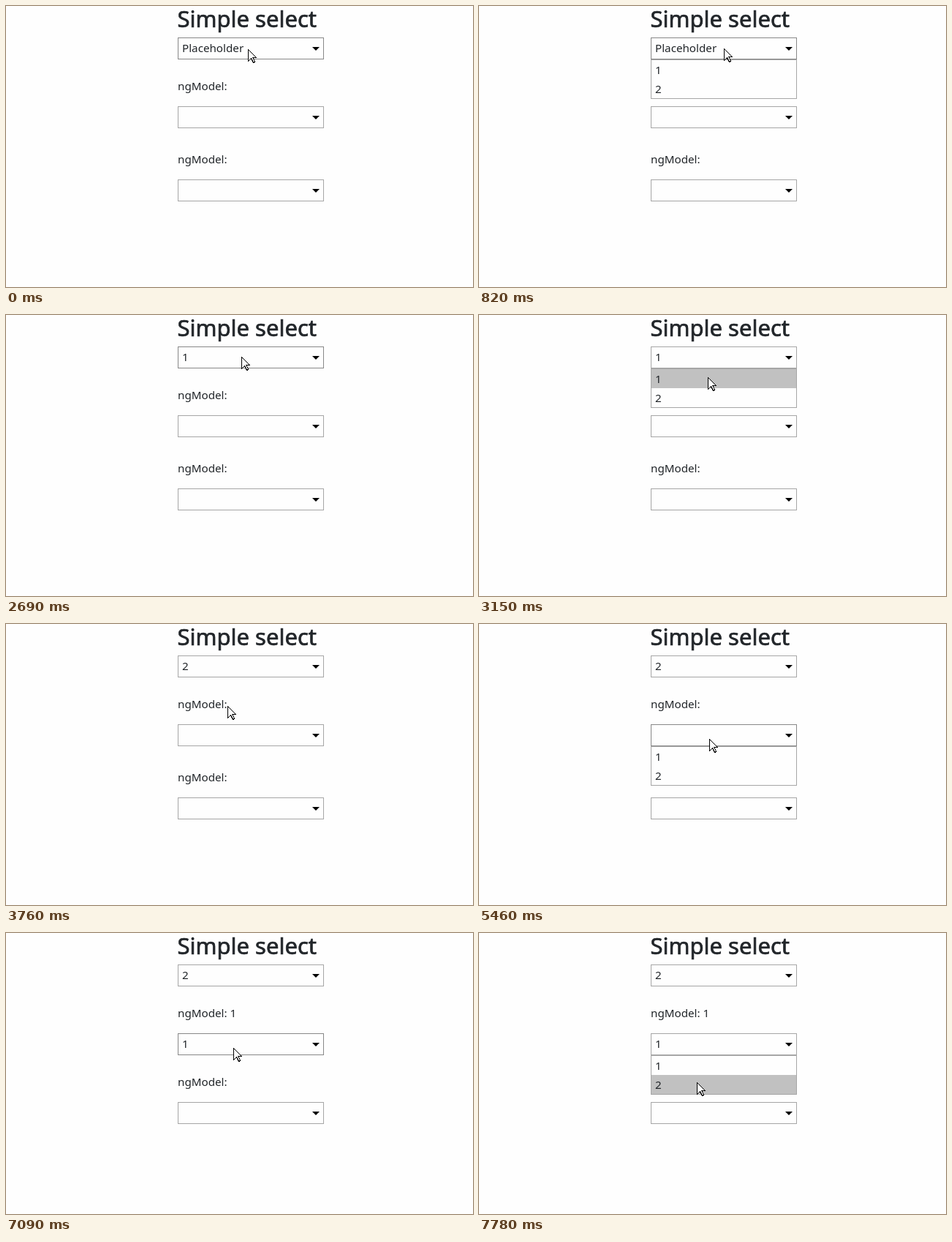
Animation, 639 px wide and 384 px high, one loop 8000 ms. Source, as an HTML page:

```html
<!DOCTYPE html>
<html lang="en">
<head>
<meta charset="utf-8">
<title>Simple select</title>
<style>
  html, body { margin: 0; width: 100%; height: 100%; overflow: hidden; background: #fefefe; }
  svg { display: block; width: 100%; height: 100%; }
  text { font: 15.2px "Noto Sans", "Open Sans", sans-serif; fill: #212529; white-space: pre; }
  .title { font-size: 31px; stroke: #212529; stroke-width: .7px; }
  .box { fill: #fefefe; stroke: #a6a6a6; }
  .box.hover { stroke: #888; }
  .row { fill: none; }
  .row.hover { fill: #c1c1c1; }
  .cursor { fill: #fff; stroke: #000; shape-rendering: crispEdges; }
</style>
</head>
<body>
<svg viewBox="0 0 639 384">
  <defs>
    <g id="field">
      <rect class="box" x="235.5" y=".5" width="199" height="29"/>
      <path d="M419 13h10l-5 5z"/>
    </g>
  </defs>
  <text class="title" x="234.5" y="29">Simple select</text>
  <g id="fields"></g>
  <g id="list">
    <rect class="box" x="235.5" y=".5" width="199" height="53"/>
    <rect class="row" x="236" y="1" width="198" height="26"/>
    <rect class="row" x="236" y="27" width="198" height="26"/>
    <text x="241" y="20">1</text>
    <text x="241" y="46">2</text>
  </g>
  <path class="cursor" id="cursor" d="M.5 .5V16.5L4.5 12.5 7.5 18.5 9.5 17.5 7 11.5H11.5Z"/>
</svg>
<script>
const LOOP = 8000;
const START = [331, 59];
// first step, last step, step count, resting point
const MOVES = [
  [270, 350, 2, 335, 58],
  [1370, 1600, 4, 318, 89],
  [2450, 2690, 4, 322, 57],
  [2996, 3380, 6, 303, 112],
  [4160, 4620, 7, 315, 154],
  [5460, 5770, 5, 312, 186],
  [6780, 7090, 5, 311, 157],
  [7470, 7780, 5, 298, 204]
];
// open time, close time, field index
const OPENINGS = [[820, 2150, 0], [2920, 3760, 0], [5000, 6230, 1], [7320, LOOP, 1]];

const NS = "http://www.w3.org/2000/svg";
const $ = id => document.getElementById(id);

function add(parent, tag, attrs) {
  const el = document.createElementNS(NS, tag);
  for (const key in attrs) el.setAttribute(key, attrs[key]);
  return parent.appendChild(el);
}

const fields = [0, 1, 2].map(i => {
  const g = add($("fields"), "g", {});
  const label = i ? add(g, "text", { x: 235, y: -22 }) : null;
  for (const part of $("field").children) g.appendChild(part.cloneNode(true));
  return { g, label, box: g.querySelector("rect"), value: add(g, "text", { x: 241, y: 20 }) };
});
const rows = [...document.querySelectorAll(".row")];

function pointer(t) {
  let [x, y] = START;
  for (const [from, to, steps, endX, endY] of MOVES) {
    if (t < from) break;
    const gap = (to - from) / (steps - 1);
    const u = Math.min(steps, Math.floor((t - from) / gap + 1.05)) / steps;
    const ease = u * u * (3 - 2 * u);
    x += (endX - x) * ease;
    y += (endY - y) * ease;
  }
  return [Math.round(x), Math.round(y)];
}

function place(el, x, y) {
  el.setAttribute("transform", `translate(${x} ${y})`);
}

function draw(t) {
  const [x, y] = pointer(t);
  const picked = t >= 6230;
  const tops = [43, 137, picked ? 231 : 237];
  const values = [t < 2150 ? "Placeholder" : t < 3760 ? "1" : "2", picked ? "1" : "", ""];

  fields.forEach((f, i) => {
    place(f.g, 0, tops[i]);
    f.box.classList.toggle("hover", y >= tops[i] && y < tops[i] + 30);
    f.value.textContent = values[i];
    if (f.label) f.label.textContent = "ngModel: " + values[i];
  });

  const open = OPENINGS.find(([from, to]) => t >= from && t < to);
  $("list").style.display = open ? "" : "none";
  if (open) {
    const top = tops[open[2]] + 30;
    place($("list"), 0, top);
    rows.forEach((row, i) => {
      const rowTop = top + 1 + i * 26;
      row.classList.toggle("hover", y >= rowTop && y < rowTop + 26);
    });
  }
  place($("cursor"), x, y);
}

const begin = performance.now();
function tick() {
  draw((performance.now() - begin) % LOOP);
  requestAnimationFrame(tick);
}
draw(0);
requestAnimationFrame(tick);
</script>
</body>
</html>
```
